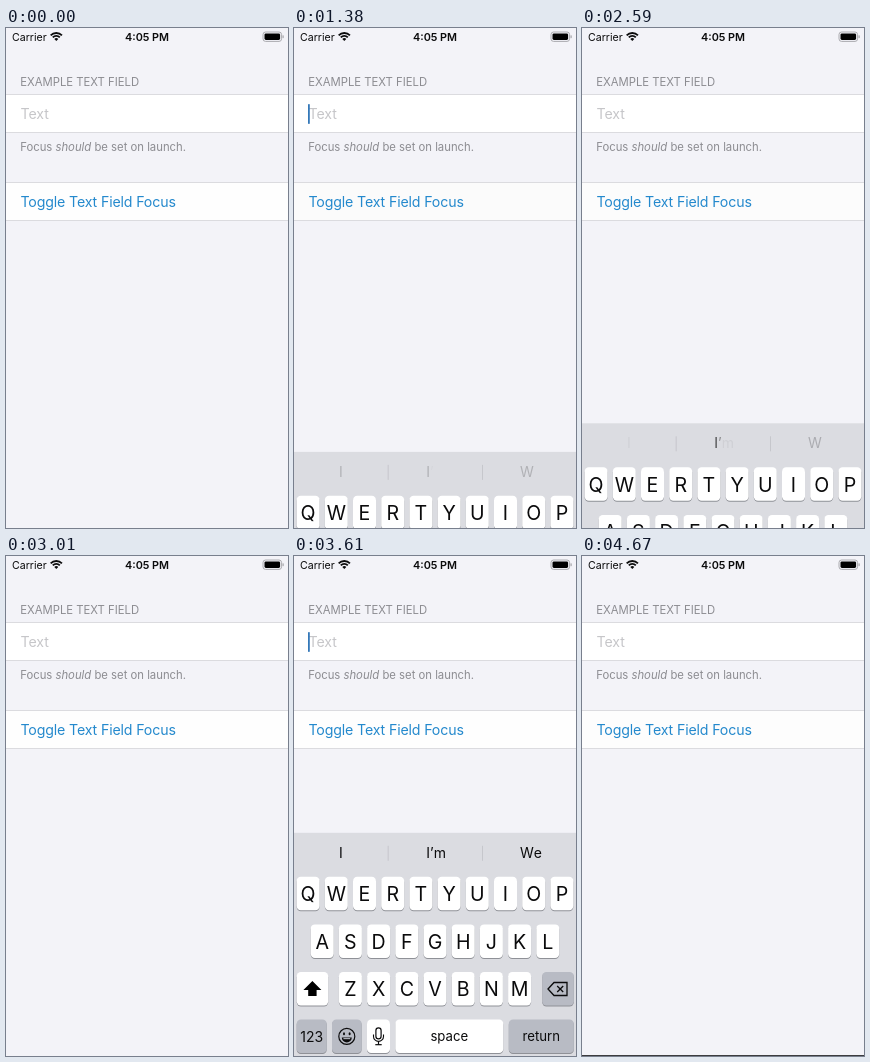
An HTML page with a canvas that plays this animation: 282x500 px, repeating every 4770 ms.

```html
<!DOCTYPE html>
<html lang="en">
<head>
<meta charset="utf-8">
<title>Text field focus</title>
<style>
html, body { margin: 0; width: 100%; height: 100%; overflow: hidden; background: #f3f3f8; }
canvas { display: block; width: 100vw; height: 100vh; }
</style>
</head>
<body>
<canvas id="stage"></canvas>
<script>
const W = 282, H = 500, LOOP = 4770;
const SANS = 'Inter, Roboto, sans-serif';
const KEYBOARD_TOP = 276, SPRING = 17;
const INK = '#0b0b0c', KEY_DARK = '#b8bbc4';

// The screen refreshes only at these moments (ms).
const TICKS = [0, 100,
  1380, 1500, 1600, 1700, 1800, 1900, 2000, 2100, 2200, 2300, 2390, 2460,
  2590, 2710, 2810, 2910, 3010, 3110, 3210, 3310, 3410, 3510, 3610, 3710,
  3810, 3910, 4010, 4110, 4200, 4270, 4370, 4470, 4570, 4670];

const TOGGLES = [
  { at: 4225 - LOOP, open: false },
  { at: 1309, open: true },
  { at: 2485, open: false },
  { at: 3149, open: true },
  { at: 4225, open: false }
];

const SUGGESTIONS = [
  { word: 'I', x: 47, fade: 110 },
  { word: 'I’m', x: 142, fade: 350 },
  { word: 'We', x: 236.5, fade: 135 }
];

const canvas = document.getElementById('stage');
const ctx = canvas.getContext('2d');
const clamp = v => Math.max(0, Math.min(1, v));
const lastBefore = (list, t, get) => list.filter(item => get(item) <= t).pop();

function resize() {
  const dpr = window.devicePixelRatio || 1;
  canvas.width = Math.round(innerWidth * dpr);
  canvas.height = Math.round(innerHeight * dpr);
}

function rect(x, y, w, h, color) {
  ctx.fillStyle = color;
  ctx.fillRect(x, y, w, h);
}

function roundRect(x, y, w, h, r, color) {
  ctx.fillStyle = color;
  ctx.beginPath();
  ctx.roundRect(x, y, w, h, r);
  ctx.fill();
}

function text(str, x, y, size, color, { align = 'left', style = '', spacing = 0 } = {}) {
  ctx.font = `${style} ${size}px ${SANS}`;
  ctx.letterSpacing = spacing + 'px';
  ctx.textAlign = align;
  ctx.fillStyle = color;
  ctx.fillText(str, x, y);
  return ctx.measureText(str).width;
}

function path(points, close) {
  ctx.beginPath();
  points.forEach(([x, y]) => ctx.lineTo(x, y));
  if (close) ctx.closePath();
}

function stroke(color, width) {
  ctx.strokeStyle = color;
  ctx.lineWidth = width;
  ctx.stroke();
}

function drawStatusBar() {
  text('Carrier', 6, 13, 10.6, INK);
  text('4:05 PM', 141, 13, 10.8, INK, { align: 'center', style: '600' });

  const cx = 50.3, cy = 13;
  const from = -Math.PI * 0.75, to = -Math.PI * 0.25;
  ctx.fillStyle = INK;
  ctx.beginPath();
  ctx.moveTo(cx, cy);
  ctx.arc(cx, cy, 2.8, from, to);
  ctx.fill();
  for (const r of [5, 8]) {
    ctx.beginPath();
    ctx.arc(cx, cy, r, from, to);
    stroke(INK, 1.8);
  }

  ctx.beginPath();
  ctx.roundRect(257, 4, 18.6, 9.4, 2.6);
  stroke('#a3a3a8', 0.9);
  roundRect(258.5, 5.4, 15.6, 6.6, 1.4, '#000');
  roundRect(276.5, 7.2, 1.2, 3, 0.6, '#a3a3a8');
}

function drawRow(top, height, tint) {
  rect(0, top, W, height, '#fff');
  if (tint) rect(0, top, W, height, `rgba(60,60,67,${tint})`);
  rect(0, top - 0.5, W, 0.9, '#d9d9dd');
  rect(0, top + height - 0.5, W, 0.9, '#d9d9dd');
}

function drawForm(state) {
  const gray = '#8c8c91', body = { spacing: -0.15 };
  text('EXAMPLE TEXT FIELD', 14.2, 57.6, 11.3, gray);
  drawRow(66.5, 38, 0);
  text('Text', 14.6, 91.2, 14.2, '#c6c6c9', body);

  let x = 14.2;
  x += text('Focus ', x, 123, 11.3, gray);
  x += text('should', x, 123, 11.3, gray, { style: 'italic' });
  text(' be set on launch.', x, 123, 11.3, gray);

  drawRow(154.5, 38, 0.02 * clamp(1 - state.age / 640));
  text('Toggle Text Field Focus', 14.4, 178.6, 14.2, '#2489cd', body);

  if (state.open) {
    const beat = state.age % 1000;
    ctx.globalAlpha = beat < 700 ? clamp((600 - beat) / 100) : clamp((beat - 900) / 100);
    roundRect(14, 76, 1.8, 20, 0.8, '#3478b9');
    ctx.globalAlpha = 1;
  }
}

function drawSuggestions(y, state) {
  for (const { word, x, fade } of SUGGESTIONS) {
    ctx.font = `14px ${SANS}`;
    ctx.letterSpacing = '0px';
    const left = x - ctx.measureText(word).width / 2;
    let dx = 0;
    for (const ch of word) {
      ctx.globalAlpha = state.open
        ? clamp((state.age - 45 - 6 * dx) / 130)
        : clamp(1 - state.age * (1 + 0.29 * dx) / fade);
      dx += text(ch, left + dx, y + 25, 14, INK);
    }
  }
  ctx.globalAlpha = 1;
  for (const x of [93.7, 188]) rect(x, y + 13, 0.9, 15, '#c3c4ca');
}

function drawKey(x, y, w, color = '#fff') {
  roundRect(x, y + 1, w, 33.5, 4.2, '#8f9197');
  roundRect(x, y, w, 33.5, 4.2, color);
}

function drawLetters(letters, firstCenter, y) {
  [...letters].forEach((ch, i) => {
    const cx = firstCenter + i * 28.2;
    drawKey(cx - 11.5, y, 23);
    text(ch, cx, y + 24.2, 19.6, INK, { align: 'center' });
  });
}

function drawShift(x, y) {
  path([[x, y - 8], [x + 9, y + 1], [x + 4.2, y + 1], [x + 4.2, y + 7],
    [x - 4.2, y + 7], [x - 4.2, y + 1], [x - 9, y + 1]], true);
  ctx.fillStyle = '#000';
  ctx.fill();
}

function drawDelete(x, y) {
  path([[x - 10, y], [x - 4, y - 6.5], [x + 9, y - 6.5], [x + 9, y + 6.5], [x - 4, y + 6.5]], true);
  stroke(INK, 1.3);
  for (const s of [-1, 1]) {
    path([[x - 0.8, y - 3 * s], [x + 5.2, y + 3 * s]]);
    stroke(INK, 1.3);
  }
}

function drawSmiley(x, y) {
  ctx.beginPath();
  ctx.arc(x, y, 8, 0, Math.PI * 2);
  stroke(INK, 1.2);
  ctx.fillStyle = INK;
  for (const s of [-1, 1]) {
    ctx.beginPath();
    ctx.ellipse(x + 2.8 * s, y - 2.6, 1, 1.5, 0, 0, Math.PI * 2);
    ctx.fill();
  }
  ctx.beginPath();
  ctx.arc(x, y + 1, 5, 0, Math.PI);
  ctx.closePath();
  ctx.fill();
  rect(x - 3.4, y + 1.7, 6.8, 1.1, KEY_DARK);
}

function drawMic(x, y) {
  ctx.beginPath();
  ctx.roundRect(x - 2.6, y - 8.5, 5.2, 11, 2.6);
  stroke(INK, 1.2);
  ctx.beginPath();
  ctx.moveTo(x - 5, y - 2);
  ctx.lineTo(x - 5, y);
  ctx.arc(x, y, 5, Math.PI, 0, true);
  ctx.lineTo(x + 5, y - 2);
  stroke(INK, 1.1);
  path([[x, y + 5], [x, y + 8.3]]);
  stroke(INK, 1.2);
  path([[x - 3.2, y + 8.3], [x + 3.2, y + 8.3]]);
  stroke(INK, 1.2);
}

function drawKeyboard(state) {
  const top = state.top;
  if (top > 499.6) return;
  if (top > 498.5) {
    rect(0, 499, W, 1, '#3c3c3f');
    return;
  }
  rect(0, top, W, H - top + 1, '#dbdce1');
  drawSuggestions(top, state);

  const rowY = i => top + 44 + i * 47.6;
  drawLetters('QWERTYUIOP', 14.1, rowY(0));
  drawLetters('ASDFGHJKL', 28.2, rowY(1));
  drawLetters('ZXCVBNM', 56.4, rowY(2));

  drawKey(2.7, rowY(2), 31.5);
  drawShift(18.4, rowY(2) + 17);
  drawKey(248.2, rowY(2), 31.6, KEY_DARK);
  drawDelete(264, rowY(2) + 17);

  const y = rowY(3), center = { align: 'center' };
  drawKey(2.7, y, 30, KEY_DARK);
  text('123', 17.7, y + 22, 14, INK, center);
  drawKey(38, y, 29.6, KEY_DARK);
  drawSmiley(52.8, y + 16.8);
  drawKey(73, y, 23);
  drawMic(84.5, y + 16.8);
  drawKey(101.3, y, 108);
  text('space', 155.3, y + 21.2, 13.2, INK, center);
  drawKey(214.8, y, 65, KEY_DARK);
  text('return', 247.3, y + 21.2, 13.2, INK, center);
}

function stateAt(t) {
  const { at, open } = lastBefore(TOGGLES, t, item => item.at);
  const age = t - at;
  // Critically damped spring
  const rest = (1 + SPRING * age / 1000) * Math.exp(-SPRING * age / 1000);
  const hidden = open ? rest : 1 - rest;
  return { open, age, top: KEYBOARD_TOP + (H - KEYBOARD_TOP) * hidden };
}

const start = performance.now();

function draw(now) {
  const elapsed = Math.max(0, now - start) % LOOP;
  const state = stateAt(lastBefore(TICKS, elapsed, v => v));
  ctx.setTransform(canvas.width / W, 0, 0, canvas.height / H, 0, 0);
  rect(0, 0, W, H, '#f3f3f8');
  drawStatusBar();
  drawForm(state);
  drawKeyboard(state);
  requestAnimationFrame(draw);
}

addEventListener('resize', resize);
resize();
draw(start);
</script>
</body>
</html>
```
